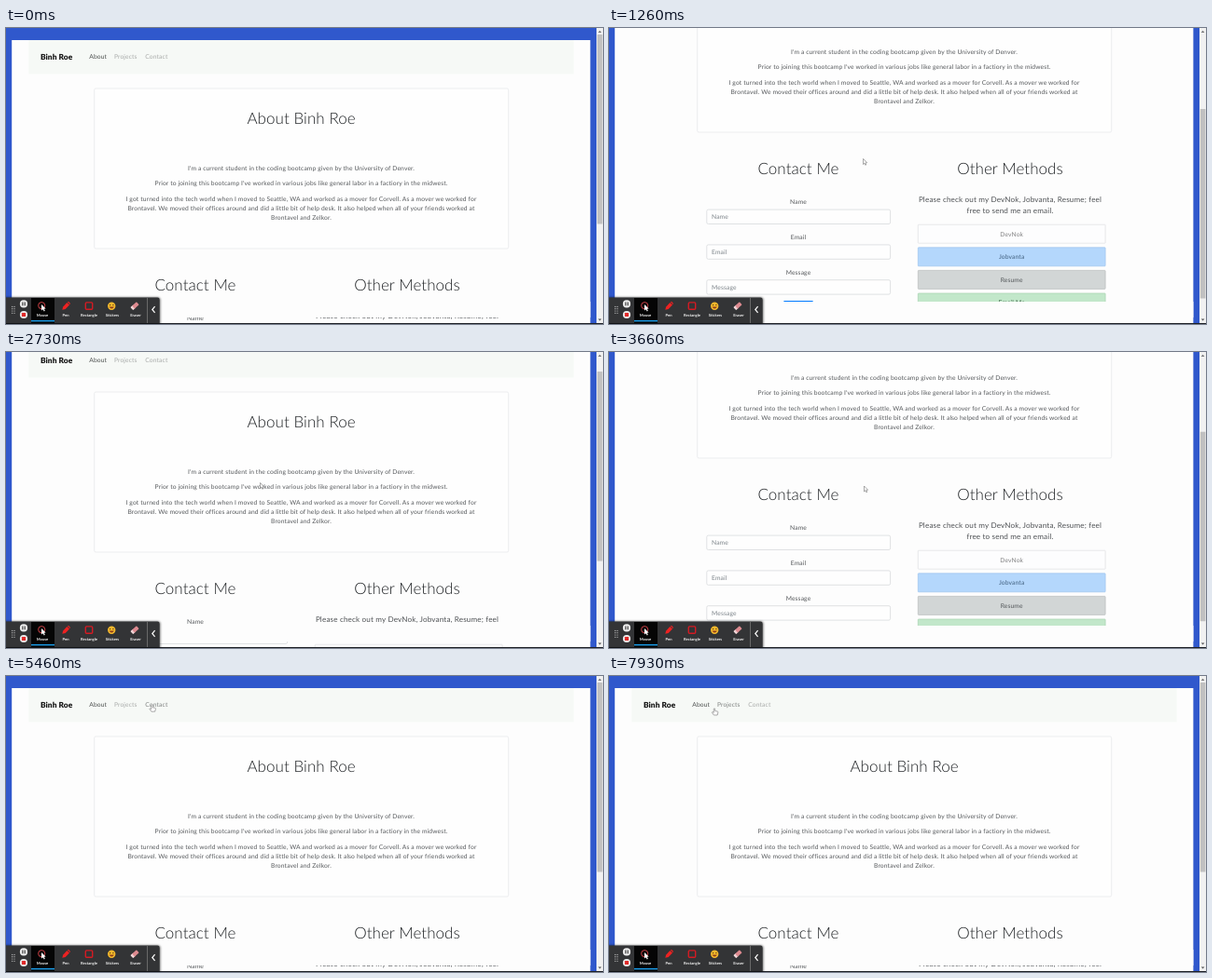
Recreate the animation shown at these times as an HTML page. Size 640 by 318 pixels, loop 8 s.

```html
<!DOCTYPE html>
<html lang="en">
<head>
<meta charset="utf-8">
<title>Portfolio walkthrough</title>
<style>
html, body { margin: 0; width: 100%; height: 100%; overflow: hidden; background: #3058cc; }
svg { display: block; width: 100vw; height: 100vh; }
text { font-family: Lato, "Open Sans", sans-serif; letter-spacing: .02em; text-rendering: geometricPrecision; }
.mid { text-anchor: middle; }
.body { font-size: 6.7px; fill: #56595c; }
.lead { font-size: 8.1px; fill: #505356; }
.head { font-size: 17px; font-weight: 300; fill: #1c1f22; letter-spacing: .003em; }
.hint { font-size: 6.7px; fill: #7d848a; }
.brand { font-size: 8.4px; font-weight: 900; fill: #161616; letter-spacing: .01em; }
.link { font-size: 6.7px; fill: #a9abaa; }
.tool { font-size: 4.1px; font-weight: 700; fill: #f2f2f2; letter-spacing: 0; }
.line { fill: #fefefe; stroke-width: .7; }
</style>
</head>
<body>
<svg id="stage" viewBox="0 0 640 318" preserveAspectRatio="none"></svg>
<script>
const LOOP = 8000, TICK = 1000 / 15;
const BLUE = '#3058cc', PAPER = '#fdfdfd';

// Markup helpers
const rect = (x, y, w, h, fill, extra = '') =>
  `<rect x="${x}" y="${y}" width="${w}" height="${h}" fill="${fill}" ${extra}/>`;
const box = (x, y, w, h, stroke) =>
  `<rect class="line" x="${x}" y="${y}" width="${w}" height="${h}" rx="1.6" stroke="${stroke}"/>`;
const path = (d, fill, extra = '') => `<path d="${d}" fill="${fill}" ${extra}/>`;
const disc = (x, y, r, fill, extra = '') =>
  `<circle cx="${x}" cy="${y}" r="${r}" fill="${fill}" ${extra}/>`;
const sizes = { body: 6.7, hint: 6.7, link: 6.7, lead: 8.1, brand: 8.4, head: 17, tool: 4.1 };
// y is the optical middle of the capitals
const text = (x, y, str, kind, extra = 'mid', style = '') =>
  `<text class="${kind} ${extra}" x="${x}" y="${y + sizes[kind] * .35}" style="${style}">${str}</text>`;

const nav = (x, w) =>
  rect(x, 13, w, 36.4, '#f6f9f6') +
  text(x + 12.6, 31, 'Binh Roe', 'brand', '') +
  text(x + 65, 31, 'About', 'link', '') +
  text(x + 91.6, 31, 'Projects', 'link', '') +
  text(x + 125, 31, 'Contact', 'link', '');

const intro = () =>
  box(94.7, 65, 444, 172, '#e4e6e8') +
  text(316.6, 97, 'About Binh Roe', 'head') +
  [
    [150.3, 'I\'m a current student in the coding bootcamp given by the University of Denver.'],
    [167, 'Prior to joining this bootcamp I\'ve worked in various jobs like general labor in a factiory in the midwest.'],
    [183.8, 'I got turned into the tech world when I moved to Seattle, WA and worked as a mover for Corvell. As a mover we worked for'],
    [193.8, 'Brontavel. We moved their offices around and did a little bit of help desk. It also helped when all of your friends worked at'],
    [203.7, 'Brontavel and Zelkor.']
  ].map(([y, s]) => text(316.5, y, s, 'body')).join('');

const field = (label, i) => {
  const y = 311.7 + i * 37.8;
  return text(203, y, label, 'body') + box(104.8, y + 8.4, 196.8, 15.4, '#d3d6d9') +
    text(110, y + 16.3, label, 'hint', '');
};

const button = ([label, fill, edge, ink], i) => {
  const y = 336.2 + i * 24.6;
  return rect(331.3, y, 200.8, 20, fill, `stroke="${edge}" stroke-width=".7" rx=".6"`) +
    text(431.7, y + 10, label, 'body', 'mid', `fill:${ink}`);
};

const contact = () =>
  text(203, 276, 'Contact Me', 'head') +
  ['Name', 'Email', 'Message'].map(field).join('') +
  rect(186.8, 418, 32.4, 15.6, '#007bff', 'rx="1.6"') +
  text(203, 425.9, 'Submit', 'body', 'mid', 'fill:#fff') +
  text(430, 276, 'Other Methods', 'head') +
  text(430, 309, 'Please check out my DevNok, Jobvanta, Resume; feel', 'lead') +
  text(430, 321.4, 'free to send me an email.', 'lead') +
  [
    ['DevNok', '#fdfdfe', '#dddfe1', '#818182'],
    ['Jobvanta', '#b4d7fc', '#9cc3ec', '#42607f'],
    ['Resume', '#d2d6d6', '#b9bdbe', '#53575a'],
    ['Email Me', '#c2e7ca', '#a6d2b0', '#41694b']
  ].map(button).join('');

const footer = w => rect(6.2, 294, w, 17, PAPER);

const scrollbar = () =>
  rect(633, 0, 7, 318, '#f1f1f1') +
  path('M634.8 5 L636.6 2.8 L638.4 5Z', '#777') +
  path('M634.8 312.4 L636.6 314.6 L638.4 312.4Z', '#555') +
  rect(633.8, 7, 5.6, 203.5, '#c1c1c1', 'id="thumb"');

const toolbar = () => {
  const tools = ['Mouse', 'Pen', 'Rectangle', 'Stickers', 'Eraser'];
  let s = rect(-3, 289.3, 168.6, 30, '#000', 'rx="3" opacity=".5" filter="url(#soft)"') +
    path('M0 289.6H162.4Q164.7 289.6 164.7 292V317H0Z', '#333436') +
    rect(27, 290, 25, 27, '#050505') + rect(27, 313.9, 25, 1.5, '#1a9be6');
  for (let i = 0; i < 8; i++) s += disc(6.7 + (i % 2) * 2.3, 299.4 + (i >> 1) * 2.3, .6, '#ccc');
  s += disc(19, 296.4, 4.1, '#ededed') + rect(17.3, 294.5, 1.1, 3.8, '#333') + rect(19.6, 294.5, 1.1, 3.8, '#333');
  s += disc(19, 308, 4.1, '#ededed') + rect(16.9, 305.9, 4.2, 4.2, '#e02a2a', 'rx=".6"');
  tools.forEach((l, i) => { s += text(39 + i * 25, 308.2, l, 'tool'); });
  s += disc(38.2, 298.2, 3.6, 'none', 'stroke="#e5484d" stroke-width=".9"') +
    path('M38 297 L38 303.6 L39.6 302.2 L40.8 304.4 L41.8 303.8 L40.7 301.8 L42.6 301.6Z', '#fff');
  s += path('M60.3 302.8 L61.2 299.4 L65.4 295 L68 297.5 L63.7 301.9Z', '#ee2222') +
    path('M66 294.5 L67 293.8 L69 295.9 L68.4 296.9Z', '#ee2222');
  s += rect(85.3, 294.9, 7.4, 7.4, 'none', 'stroke="#d41b23" stroke-width="1.4" rx="1"');
  s += disc(113.2, 298.8, 4.2, '#f5b92c') + disc(111.6, 297.6, .7, '#4a3210') + disc(114.9, 297.6, .7, '#4a3210') +
    path('M110.6 299.6 Q113.2 303.6 115.9 299.6Z', '#8b3a1a');
  s += '<g transform="rotate(-42 138 298.7)">' + rect(133.6, 296.6, 4, 4.2, '#f0d5d7', 'rx=".8"') +
    rect(136, 296.6, 6.4, 4.2, '#dd8a90', 'rx=".8"') + '</g>';
  return s + rect(151.2, 290, .8, 27, '#777') +
    path('M159.6 299.2 L156.8 302.5 L159.6 305.8', 'none', 'stroke="#fff" stroke-width="1.2"');
};

const edge = 'stroke="#666" stroke-width=".55" stroke-linejoin="round"';
const pointers =
  path('M0 0 L0 6 L1.4 4.8 L2.3 6.8 L3.2 6.4 L2.3 4.4 L4.1 4.2Z', '#fff', `id="arrow" ${edge}`) +
  path('M-.7 .4 Q0 -.5 .7 .4 V2.8 L3.4 3.3 Q4 3.5 3.9 4.3 L3.2 7.2 H-.6 L-2.6 4.4 Q-2.4 3.5 -1.5 4 L-.7 4.6Z',
    '#fff', `id="hand" ${edge}`);

const $ = id => document.getElementById(id);
$('stage').innerHTML =
  '<filter id="soft"><feGaussianBlur stdDeviation="1"/></filter>' +
  rect(0, 0, 640, 318, BLUE) +
  '<g id="home"><g id="page">' + rect(6.2, 13, 620.2, 453.5, PAPER) + nav(24.3, 584.4) +
  intro() + contact() + '</g>' + footer(620.2) + scrollbar() + '</g>' +
  '<g id="form">' + rect(6.2, 13, 627.2, 257.5, PAPER) + nav(24.9, 590.4) +
  '<g transform="translate(3.6 -196)">' + contact() + '</g>' + footer(627.2) + '</g>' +
  rect(0, 317, 640, 1, '#1d2026') + toolbar() +
  disc(0, 0, 9.4, '#e0475e', 'id="ring" fill-opacity=".12" stroke="#d8405a" stroke-width="1.1"') +
  `<g id="cursor">${pointers}</g>`;

// Rows are [tick, values...], 15 ticks per second
const scrollKeys = [[13, 0], [14, 8], [19, 125], [22, 152], [28, 152], [35, 0], [40, 0],
  [41, 22], [46, 125], [49, 152], [53, 152], [55, 123], [61, 0]];
const cursorKeys = [[1, 60, 285], [11, 272.5, 140.5], [53, 272.5, 140.5], [55, 273.5, 144],
  [64, 167.5, 94.5], [70, 153, 60], [76, 156.5, 31], [103, 156.5, 31], [108, 100, 30],
  [112, 100, 30], [119, 113, 34.8]];
const clicks = [[91, 157.6, 30.6], [106, 100, 30]];
const OPEN_FORM = 94, OPEN_HOME = 110;
const links = [[86, 111], [112, 144], [146, 177]];

function sample(keys, k) {
  const i = keys.findIndex(row => row[0] > k);
  if (i < 0) return keys[keys.length - 1].slice(1);
  if (i === 0) return keys[0].slice(1);
  const a = keys[i - 1], b = keys[i], p = (k - a[0]) / (b[0] - a[0]);
  return a.slice(1).map((v, n) => v + (b[n + 1] - v) * p);
}

const show = (id, on) => $(id).setAttribute('visibility', on ? 'visible' : 'hidden');
const move = (id, x, y) => $(id).setAttribute('transform', `translate(${x} ${y})`);
const labels = [...document.querySelectorAll('.link')];

function draw(ms) {
  let k = Math.floor((ms + 7) / TICK);
  if (k && k % 3 === 0) k--;

  const onForm = k >= OPEN_FORM && k < OPEN_HOME;
  $('home').style.display = onForm ? 'none' : '';
  $('form').style.display = onForm ? '' : 'none';

  const [scroll] = sample(scrollKeys, k);
  move('page', 0, -scroll);
  move('thumb', 0, scroll * .64);

  const [x, y] = sample(cursorKeys, k);
  const over = y > 23 && y < 37 ? links.findIndex(([a, b]) => x >= a && x <= b) : -1;
  move('cursor', x, y);
  show('arrow', k > 0 && over < 0);
  show('hand', over >= 0);
  labels.forEach((el, i) => {
    el.style.fill = i % 3 === 0 ? '#4c4f4e' : i % 3 === over ? '#7f8281' : '#a9abaa';
  });

  const click = clicks.find(([start]) => k >= start && k < start + 10);
  show('ring', click);
  if (click) {
    const age = k - click[0];
    move('ring', click[1], click[2]);
    $('ring').setAttribute('r', Math.min(9.4, 4 + age * 1.8));
    $('ring').setAttribute('opacity', Math.min(1, (10 - age) / 3));
  }
}

const start = performance.now();
function frame() {
  draw((performance.now() - start) % LOOP);
  requestAnimationFrame(frame);
}
frame();
</script>
</body>
</html>
```
